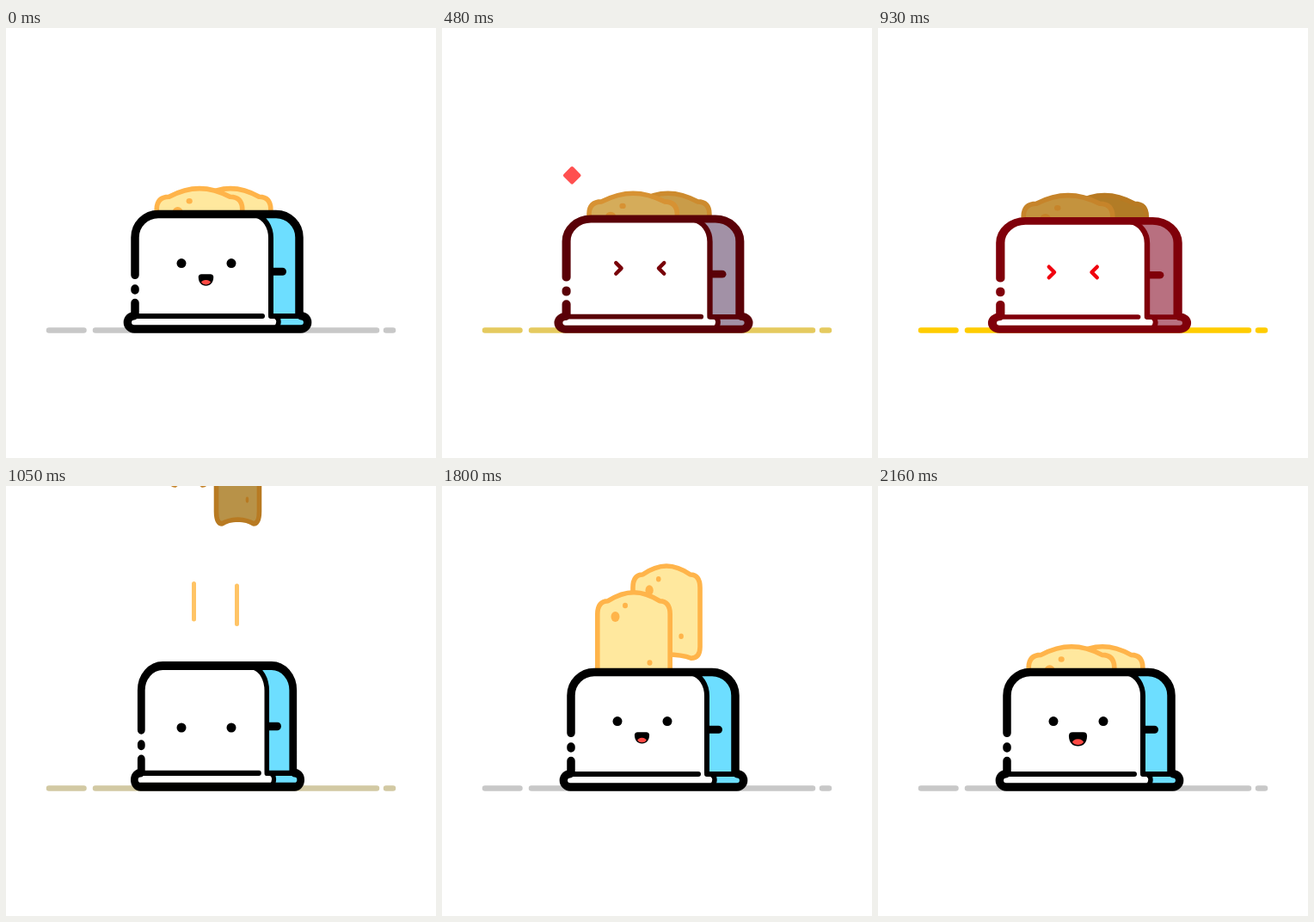
Write an HTML page with a canvas that moves like this. It is 500 by 500 pixels and loops after 2.19 s.

```html
<!DOCTYPE html>
<html lang="en">
<head>
<meta charset="utf-8">
<title>Toaster</title>
<style>
html, body { margin: 0; width: 100%; height: 100%; overflow: hidden; background: #fff; }
canvas { display: block; width: 500px; height: 500px; }
</style>
</head>
<body>
<canvas id="stage"></canvas>
<script>
const LOOP = 2190, STEP = 30;
const canvas = document.getElementById('stage');
const ctx = canvas.getContext('2d');
const dpr = window.devicePixelRatio || 1;
canvas.width = canvas.height = Math.round(500 * dpr);

const clamp = v => Math.min(1, Math.max(0, v));
const lerp = (a, b, k) => a + (b - a) * k;
const ramp = (t, a, b) => clamp((t - a) / (b - a));
const smooth = (t, a, b) => { const k = ramp(t, a, b); return k * k * (3 - 2 * k); };
const mix = (a, b, k) => `rgb(${a.map((v, i) => Math.round(lerp(v, b[i], k))).join()})`;

const BLACK = [0, 0, 0], CYAN = [109, 222, 255];
const CRUMB = [255, 232, 158], CRUST = [255, 180, 74];
const BREADS = [
  { x: 261, w: 0.925, wide: 1.2, shift: 2.5, late: 13, popX: 269.5, popW: 0.64, rise: 268,
    fill: [178, 124, 38], edge: [184, 122, 34] },
  { x: 223, w: 1, wide: 1.18, shift: -4, late: 0, popX: 212.5, popW: 0.52, rise: 313,
    fill: [196, 147, 62], edge: [198, 132, 42] }
];

function stroke(path, color, width) {
  ctx.strokeStyle = color;
  ctx.lineWidth = width;
  ctx.stroke(new Path2D(path));
}
function fill(path, color) {
  ctx.fillStyle = color;
  ctx.fill(new Path2D(path));
}
function oval(x, y, rx, ry, color) {
  ctx.fillStyle = color;
  ctx.beginPath();
  ctx.ellipse(x, y, rx, ry, 0, 0, 7);
  ctx.fill();
}

function heat(t) {
  return t < 960 ? smooth(t, 0, 750) : 1 - smooth(t, 975, 1040);
}

// 1 is fully squashed, -1 fully stretched
function squash(t) {
  if (t < 960) return smooth(t, 0, 750);
  if (t < 1050) return lerp(1, -0.95, smooth(t, 970, 1045));
  if (t < 1440) return -0.95 * (1 - smooth(t, 1050, 1410));
  return -0.35 * Math.sin(Math.PI * ramp(t, 1860, 2130));
}

function drawGround(t) {
  const k = t < 950 ? smooth(t, 0, 930) : 1 - smooth(t, 970, 1080);
  stroke('M50 351.6H90.5M104 351.6H431M442 351.6H450', mix([200, 200, 200], [255, 204, 0], k), 6.5);
}

function breadPose(b, t) {
  const rest = { x: b.x + (b.w === 1 ? 2 : 0), y: 184, sx: b.wide, sy: 0.96 };
  if (t < 985) {
    const k = heat(t);
    rest.x += b.shift * k;
    rest.y += 8 * k;
    rest.sx *= 1 + 0.04 * k;
    return rest;
  }
  if (t < 1110) {
    const u = (t - 985) / 65, k = clamp(u);
    return { x: lerp(rest.x, b.popX, k), y: 192 - b.rise * u,
             sx: lerp(b.wide, b.popW, k), sy: lerp(0.96, 1.09, k) };
  }
  const start = 1660 + b.late;
  if (t < start) return null;
  const y = -120 + 241 * Math.pow((t - start) / 140, 1.4);
  if (y < 184) return { x: b.x, y, sx: 1, sy: 1 };
  const v = t - start - 165, k = smooth(v, 0, 150);
  return { x: lerp(b.x, rest.x, k), y: 184 + 18 * Math.exp(-v / 75) * Math.sin(v / 45),
           sx: lerp(1, b.wide, k), sy: lerp(1, 0.96, k) };
}

function drawBread(b, t) {
  const p = breadPose(b, t);
  if (!p) return;
  const flying = t >= 985 && t < 1110;
  const k = flying ? 1 : heat(t);
  const edge = mix(CRUST, b.edge, k);
  ctx.save();
  ctx.translate(p.x, p.y);
  ctx.scale(p.sx * b.w, p.sy);
  const shape = 'M-42.2 28Q-42.2 13-30 12.7C-18 5-10 2.7 0 2.7S18 5 30 12.7Q42.2 13 42.2 28' +
    'V97Q42 110 31 110Q20 106 0 105.5Q-20 106-31 110Q-42 110-42.2 97Z';
  fill(shape, mix(CRUMB, flying ? [184, 146, 72] : b.fill, k));
  oval(-21.5, 31, 5, 6, edge);
  oval(-10, 18, 3, 3.3, edge);
  oval(18.5, 84.5, 3, 3.3, edge);
  const path = new Path2D(shape);
  ctx.restore();

  // keep the crust an even width while the slice is stretched
  const placed = new Path2D();
  placed.addPath(path, new DOMMatrix([p.sx * b.w, 0, 0, p.sy, p.x, p.y]));
  ctx.strokeStyle = edge;
  ctx.lineWidth = 5.6;
  ctx.stroke(placed);
}

function drawStreaks(t) {
  if (t < 1030 || t > 1170) return;
  const up = 1.5 * (t - 1050);
  stroke(`M218.5 ${113.5 - up}V${155 - up}M268.5 ${116 - up}V${160.5 - up}`, '#ffc466', 5);
}

function drawToaster(t) {
  const k = heat(t), s = squash(t);
  const ink = mix(BLACK, [128, 0, 10], k);
  const side = mix(CYAN, [184, 112, 128], k);
  ctx.save();
  ctx.translate(246, 354.5);
  ctx.scale(1 + 0.08 * s, 1 - 0.057 * s);
  ctx.translate(-246, -354.5);

  fill('M150 336V243.5A27 27 0 0 1 177 216.5H314A27 27 0 0 1 341 243.5V336Z', side);
  fill('M149 342V243.5A27 27 0 0 1 177 216.5H288C301 219 308 231 308 244V342Z', '#fff');
  fill('M149 334.7H343A7.6 7.6 0 0 1 343 350H149A7.6 7.6 0 0 1 149 334.7Z', side);
  fill('M149 333H308L316 338V350H149A7.6 7.6 0 0 1 149 334.7Z', '#fff');

  stroke('M150 319.5V333M150 303V305M150 287.3V243.5A27 27 0 0 1 177 216.5H314A27 27 0 0 1 341 243.5V333', ink, 9.5);
  stroke('M290 217.5C301 220 308 231 308 244V334M308 335H343', ink, 6);
  stroke('M311 283.3H321.5', ink, 9);
  stroke('M150 334.9H298', ink, 6);
  stroke('M309 335H312Q317 336.5 317 341.5Q317 346 313.5 349', ink, 5.5);
  stroke('M149 334.7A7.6 7.6 0 0 0 149 350H343A7.6 7.6 0 0 0 343 334.7', ink, 9.4);
  ctx.restore();
}

function drawEyes(t) {
  if (t >= 240 && t < 1010) {
    const u = Math.min(t, 960) / 450;
    const x = -3.5 * u, y = 274.5 + 4.6 * u;
    const k = Math.pow(heat(t), 2.6);
    ctx.save();
    ctx.translate(x, y);
    stroke('M206 -6.3L212.3 0L206 6.3M262 -6.3L255.7 0L262 6.3', mix([40, 0, 4], [240, 0, 14], k), 4.4);
    ctx.restore();
    return;
  }
  const y = t < 240 ? 273.6 + t * 0.01 : 273.6 + 7.4 * (1 - smooth(t, 1050, 1290));
  oval(204, y, 5.5, 5.5, '#000');
  oval(262, y, 5.5, 5.5, '#000');
}

function mouthSize(t) {
  if (t < 1000) return 1.02 * (1 - ramp(t, 0, 150));
  if (t < 1800) return smooth(t, 1110, 1380);
  if (t < 2130) return lerp(1, 1.42, smooth(t, 1830, 2010));
  return lerp(1.42, 1.04, ramp(t, 2130, 2190));
}

function drawMouth(t) {
  const size = mouthSize(t);
  if (size < 0.02) return;
  const shape = 'M-5 0H5Q8.6 0 8.6 3.6C8.4 10 5 13.2 0 13.2S-8.4 10-8.6 3.6Q-8.6 0-5 0Z';
  ctx.save();
  ctx.translate(232.5, 286.2);
  ctx.scale(size, size);
  fill(shape, '#000');
  ctx.clip(new Path2D('M-7 2H7Q7 12 0 12Q-7 12-7 2Z'));
  oval(0, 10.5, 5.6, 3.9, '#ff4a44');
  ctx.restore();
}

function drawSpark(t) {
  const size = smooth(t, 330, 440) * (1 - smooth(t, 540, 660));
  if (size < 0.02) return;
  ctx.save();
  ctx.translate(151.2, 171.3);
  ctx.scale(size, size);
  const shape = 'M0 -8.3L8.3 0L0 8.3L-8.3 0Z';
  fill(shape, '#ff5050');
  stroke(shape, '#ff5050', 4);
  ctx.restore();
}

function draw(t) {
  ctx.setTransform(dpr, 0, 0, dpr, 0, 0);
  ctx.fillStyle = '#fff';
  ctx.fillRect(0, 0, 500, 500);
  ctx.lineCap = ctx.lineJoin = 'round';
  drawGround(t);
  drawStreaks(t);
  BREADS.forEach(b => drawBread(b, t));
  drawToaster(t);
  drawEyes(t);
  drawMouth(t);
  drawSpark(t);
}

const begin = performance.now();
function tick() {
  const t = (performance.now() - begin) % LOOP;
  draw(Math.floor(t / STEP) * STEP);
  requestAnimationFrame(tick);
}
tick();
</script>
</body>
</html>
```
